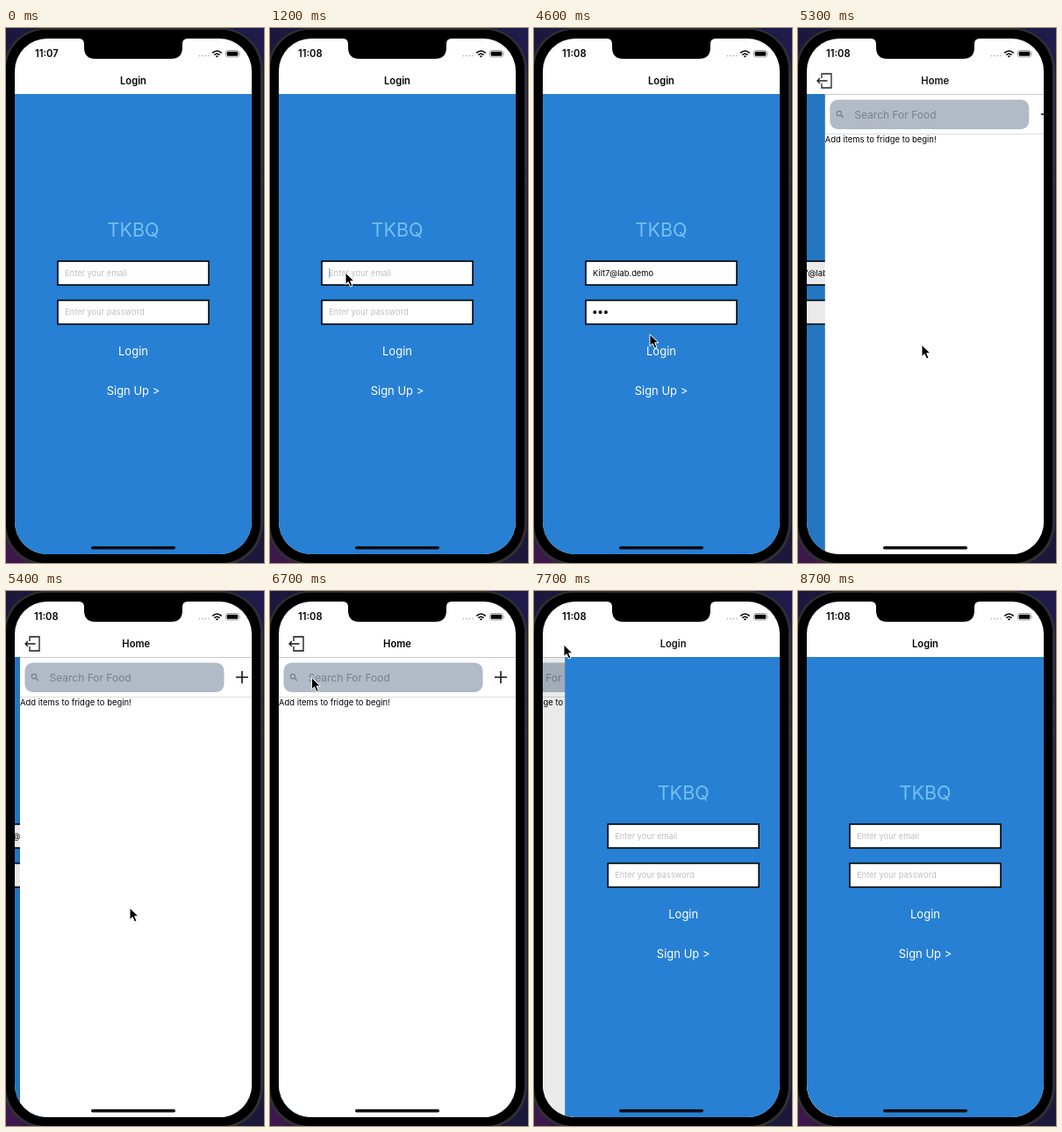
These frames come from a looping animation (294x608 px, 8.8 s). An HTML page:

```html
<!DOCTYPE html>
<html lang="en">
<head>
<meta charset="utf-8">
<title>Login flow</title>
<style>
  html, body { margin: 0; width: 100%; height: 100%; overflow: hidden; background: #000; }
  svg { display: block; width: 294px; height: 608px; }
  text { font-family: Inter, Roboto, sans-serif; white-space: pre; }
  .bar { font-weight: 600; font-size: 11.2px; }
  .mid { text-anchor: middle; }
  .small { font-size: 9.3px; }
  .btn { font-size: 13px; fill: #fff; text-anchor: middle; }
  .line { fill: none; stroke: #111; stroke-width: 1.3; }
</style>
</head>
<body>
<svg viewBox="0 0 294 608">
  <defs>
    <linearGradient id="desk" x1="1" y1="0" x2="0" y2="1">
      <stop offset="0" stop-color="#1f1b4c"/>
      <stop offset=".6" stop-color="#1b1838"/>
      <stop offset="1" stop-color="#3f184c"/>
    </linearGradient>
    <clipPath id="screen"><rect x="10" y="12" width="270" height="586" rx="37"/></clipPath>
  </defs>

  <rect width="294" height="608" fill="url(#desk)"/>
  <rect x="-3" y="0" width="296" height="611" rx="48" fill="#303034"/>
  <rect x="0" y="2" width="290" height="606" rx="45" fill="#000"/>

  <g clip-path="url(#screen)">
    <rect x="10" y="12" width="270" height="586" fill="#fff"/>
    <g id="views">
      <g id="login">
        <rect x="10" y="75" width="270" height="523" fill="#2780d3"/>
        <text class="mid" x="145" y="237" font-size="21.6" fill="#74bfee">TKBQ</text>
        <g fill="#fff" stroke="#000" stroke-width="1.6">
          <rect x="59" y="265" width="172" height="27"/>
          <rect x="59" y="309.5" width="172" height="27"/>
        </g>
        <text id="email" class="small" x="67" y="282"></text>
        <text id="pass" class="small" x="67" y="326"></text>
        <g id="dots">
          <circle cx="69.3" cy="323" r="2"/><circle cx="75.6" cy="323" r="2"/><circle cx="81.9" cy="323" r="2"/>
        </g>
        <rect id="caret" width="1.2" height="12" fill="#4a72dc"/>
        <text id="submit" class="btn" x="145" y="372">Login</text>
        <text class="btn" x="145" y="416.5">Sign Up &gt;</text>
        <rect id="loginDim" x="10" y="75" width="270" height="523"/>
      </g>
      <g id="home">
        <rect x="10" y="75" width="270" height="523" fill="#fff"/>
        <path d="M10 75.500h270" stroke="#c9c9cc"/>
        <rect x="15.5" y="81.5" width="227" height="33.5" rx="9" fill="#b1bac6"/>
        <g class="line" style="stroke:#778290">
          <circle cx="26" cy="97" r="2.7"/><path d="M28 99l3 3"/>
        </g>
        <text x="43.500" y="102.5" font-size="12" fill="#778290">Search For Food</text>
        <path class="line" style="stroke-width:1.6" d="M256 98h14M263 91v14"/>
        <path d="M10 120.5h270" stroke="#dcdcde"/>
        <text x="10" y="130" font-size="9.45">Add items to fridge to begin!</text>
        <rect id="homeDim" x="10" y="75" width="270" height="523"/>
      </g>
    </g>

    <text id="loginTitle" class="bar mid" y="64">Login</text>
    <text id="homeTitle" class="bar mid" y="64">Home</text>
    <path id="exit" class="line" d="M27 57V52H38V68H27V63M33.5 60H22M25 57L22 60L25 63"/>

    <text id="clock" class="bar" y="33"></text>
    <g fill="#bbb">
      <circle cx="220.5" cy="31.5" r=".9"/><circle cx="224" cy="31.5" r=".9"/>
      <circle cx="227.5" cy="31.5" r=".9"/><circle cx="231" cy="31.5" r=".9"/>
    </g>
    <path d="M235.3 28.3q5.2-4.6 10.4 0M237.4 30.6q3.1-2.7 6.2 0" fill="none" stroke="#000" stroke-width="1.6"/>
    <path d="M238.9 31.9q1.6-1.3 3.2 0l-1.6 1.7z"/>
    <rect x="250.5" y="25.5" width="15" height="7.5" rx="2.2" fill="none" stroke="#999" stroke-width=".9"/>
    <rect x="251.7" y="26.7" width="12.6" height="5.1" rx="1.2"/>
    <path d="M266.7 27.7q1.6 1.5 0 3z" fill="#999"/>
    <rect x="97" y="589" width="96" height="3.4" rx="1.7" fill="#0b0b10"/>
  </g>
  <path d="M83 11v1q6 0 6 6v4q0 13 13 13h86q13 0 13-13v-4q0-6 6-6v-1z"/>
  <path id="cursor" d="M0 0V13.5L3.2 10.6L5.5 16L8 15L5.7 9.7H10Z"
        stroke="#fff" stroke-width="1" stroke-linejoin="round"/>
</svg>

<script>
const LOOP = 8800, WIDTH = 270;
const EMAIL = 'Kilt7@lab.demo';
const PUSH = 5020, BACK = 7436;
const FOCUS = 1150, NEXT_FIELD = 3700;
const emailKeys = [1800, 1950, 2100, 2200, 2400, 2700, 2900, 3000, 3100, 3200, 3300, 3400, 3500, 3600];
const passKeys = [4000, 4100, 4200];

// Pointer path: time, x, y
const stops = [
  [300, -14, 400], [900, 86, 278], [4350, 86, 278], [4600, 132, 348],
  [4750, 141, 360], [6000, 141, 360], [6900, 34, 61], [8000, 34, 61], [8350, -14, 90]
];

const el = {};
document.querySelectorAll('svg [id]').forEach(n => el[n.id] = n);
const dots = [...el.dots.children];

const clamp = v => Math.max(0, Math.min(1, v));
const set = (node, name, value) => node.setAttribute(name, value);
const fade = (node, value) => set(node, 'opacity', value);
const shift = (node, x, y = 0) => set(node, 'transform', `translate(${x} ${y})`);
const typed = (keys, t) => keys.filter(k => k <= t).length;

// Critically damped slide, 0 to 1
function slide(t, start) {
  const u = (t - start) * 0.015;
  if (u <= 0) return 0;
  const left = (1 + u) * Math.exp(-u);
  return left < 0.002 ? 1 : 1 - left;
}

function pointer(t) {
  const next = stops.findIndex(s => s[0] > t);
  if (next < 1) return stops[next < 0 ? stops.length - 1 : 0].slice(1);
  const [t0, x0, y0] = stops[next - 1], [t1, x1, y1] = stops[next];
  const u = (t - t0) / (t1 - t0), e = u * u * (3 - 2 * u);
  return [x0 + (x1 - x0) * e, y0 + (y1 - y0) * e];
}

function fill(node, value, hint) {
  node.textContent = value || hint;
  set(node, 'fill', value ? '#000' : '#bfbfc3');
}

function drawForm(t) {
  const fresh = t >= BACK;
  const letters = fresh ? 0 : typed(emailKeys, t);
  const marks = fresh ? 0 : typed(passKeys, t);
  fill(el.email, EMAIL.slice(0, letters), 'Enter your email');
  fill(el.pass, '', marks ? '' : 'Enter your password');
  dots.forEach((d, i) => fade(d, i < marks ? 1 : 0));

  const second = t >= NEXT_FIELD;
  const last = Math.max(...[FOCUS, NEXT_FIELD, ...emailKeys, ...passKeys].filter(k => k <= t));
  const idle = t - last;
  const live = t >= FOCUS && t < 4700 && idle % 780 < 380;
  const startFade = t < emailKeys[0] ? clamp((idle % 780) / 100) : 1;
  fade(el.caret, live ? startFade : 0);
  const textEnd = letters ? 67.3 + el.email.getComputedTextLength() : 67;
  set(el.caret, 'x', second ? 67 + marks * 6.3 : textEnd);
  set(el.caret, 'y', second ? 317 : 272.5);

  fade(el.submit, t > 4780 && t < 5300 ? 0.2 + 0.8 * clamp((t - 4900) / 250) : 1);
}

function place(view, dim, title, p, incoming) {
  const late = Math.max(0, p - 0.25);
  shift(view, incoming ? WIDTH * (1 - p) : -0.3 * WIDTH * p);
  fade(dim, incoming ? 0 : 0.09 * p);
  set(title, 'x', incoming ? 145 + 146 * (1 - p) : 145 - 40 * late);
  fade(title, incoming ? p : 1 - clamp(late / 0.5));
}

function draw(t) {
  const back = t >= BACK;
  const p = slide(t, back ? BACK : PUSH);
  const login = [el.login, el.loginDim, el.loginTitle];
  const home = [el.home, el.homeDim, el.homeTitle];
  place(...login, p, back);
  place(...home, p, !back);
  const top = back ? el.login : el.home;
  if (el.views.lastElementChild !== top) el.views.append(top);
  fade(el.exit, back ? clamp(1 - p * 2.9) : p);

  drawForm(t);
  const early = t < 500;
  el.clock.textContent = early ? '11:07' : '11:08';
  set(el.clock, 'x', early ? 33 : 32);
  shift(el.cursor, ...pointer(t));
}

const start = performance.now();
function tick() {
  draw((performance.now() - start) % LOOP);
  requestAnimationFrame(tick);
}
tick();
</script>
</body>
</html>
```
